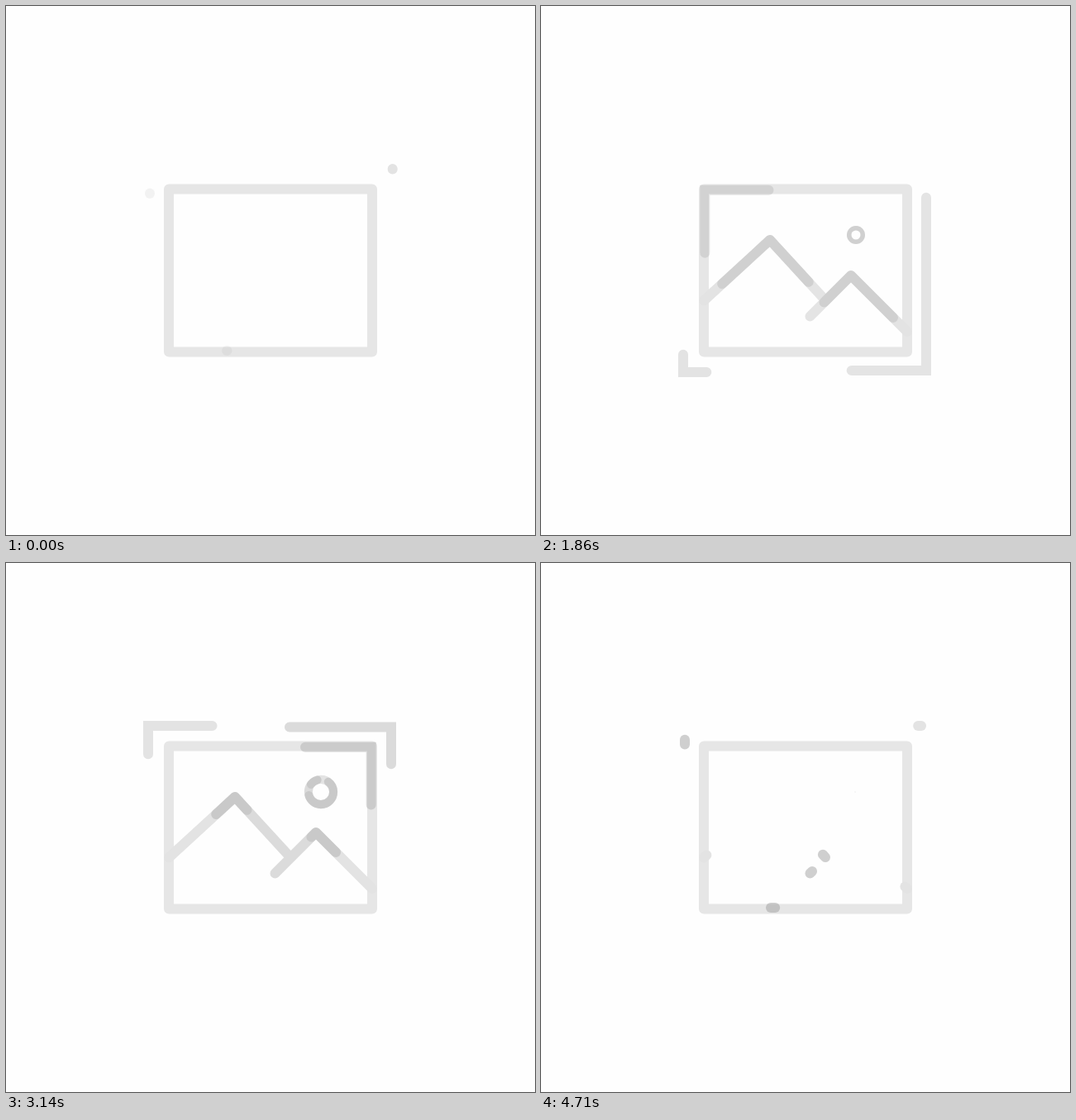
Recreate the animation shown at these times as an HTML page. Size 640 px wide and 640 px high, loop 4.78 s.

```html
<!DOCTYPE html>
<html lang="en">
<head>
<meta charset="utf-8">
<title>Picture placeholder</title>
<style>
  html, body { margin: 0; height: 100%; overflow: hidden; background: #fefefe; }
  svg { display: block; width: 100vw; height: 100vh; }
  path, rect { fill: none; stroke-width: 12; stroke-linecap: round; }
  .hill, rect { stroke-linejoin: round; }
  .ring { stroke-width: 10; }
</style>
</head>
<body>
<svg viewBox="0 0 640 640">
  <rect x="197" y="221.5" width="246" height="197" stroke="#e6e6e6"/>
  <g id="light" stroke="#e3e3e3"></g>
  <g id="shade" stroke="#999"></g>
</svg>
<script>
const DURATION = 4780, STEPS = 67;
const light = document.getElementById('light');
const shade = document.getElementById('shade');

function addPath(group, d, className) {
  const path = document.createElementNS('http://www.w3.org/2000/svg', 'path');
  path.setAttribute('d', d);
  path.setAttribute('class', className);
  path.setAttribute('pathLength', 1);
  return group.appendChild(path);
}

// Two turns around a circle, starting at the top.
const turns = sweep => 'M0-15' + `a15 15 0 1 ${sweep} 0 30a15 15 0 1 ${sweep} 0-30`.repeat(2);

const lightBox = addPath(light, 'M467.7 197V443H172V197H467.7', 'box');
const shadeBox = addPath(shade, 'M174 226.5V441H466V198.4H174V226.5', 'box');
const innerBox = addPath(shade, 'M267.5 417H198.3V222.7H441.7V417H267.5', 'box');
const hills = [
  addPath(light, 'M197 356.5L277 283L344 356', 'hill'),
  addPath(light, 'M443 394L375 326L325.5 375.5', 'hill'),
  addPath(shade, 'M344 356L277 283L197 356.5', 'hill'),
  addPath(shade, 'M325.5 375.5L375 326L443 394', 'hill')
];
const lightRing = addPath(light, turns(0), 'ring');
const shadeRing = addPath(shade, turns(1), 'ring');

// Moves evenly from 0 to a at 40%, to b at 60%, then to the end of the loop.
function edge(p, a, b, end = 1) {
  if (p < .4) return a * p / .4;
  if (p < .6) return a + (b - a) * (p - .4) / .2;
  return b + (end - b) * (p - .6) / .4;
}

function trim(path, start, end) {
  path.style.strokeDasharray = `${Math.max(end - start, .0005)} 9`;
  path.style.strokeDashoffset = -start;
}

function draw(p) {
  const left = 1 - p;
  shade.setAttribute('opacity', .105 + .36 * p);

  trim(lightBox, edge(p, .487, .643), edge(p, .534, .764));
  trim(shadeBox, p, p + Math.min(.72 * p, .46 * left));
  trim(innerBox, p - Math.min(.65 * Math.max(0, p - .12), left / 2), p);

  for (const hill of hills) {
    hill.style.visibility = p ? 'visible' : 'hidden';
    trim(hill, 0, Math.min(p / .455, left / .545));
  }

  trim(lightRing, edge(p, 0, 0), edge(p, .5, .5));
  trim(shadeRing, edge(p, 0, 0, .34), edge(p, .5, .5, .34));
  const radius = Math.min(152 * p, 109 * left, 9 + 190 * Math.max(0, Math.abs(p - .5) - .1));
  for (const ring of [lightRing, shadeRing]) {
    ring.setAttribute('transform', `translate(381 277) scale(${radius / 20})`);
  }
}

function tick() {
  const time = performance.now() % DURATION;
  const step = Math.floor((time + 3) / DURATION * STEPS) % STEPS;
  draw(step / (STEPS - .2));
  requestAnimationFrame(tick);
}
tick();
</script>
</body>
</html>
```
